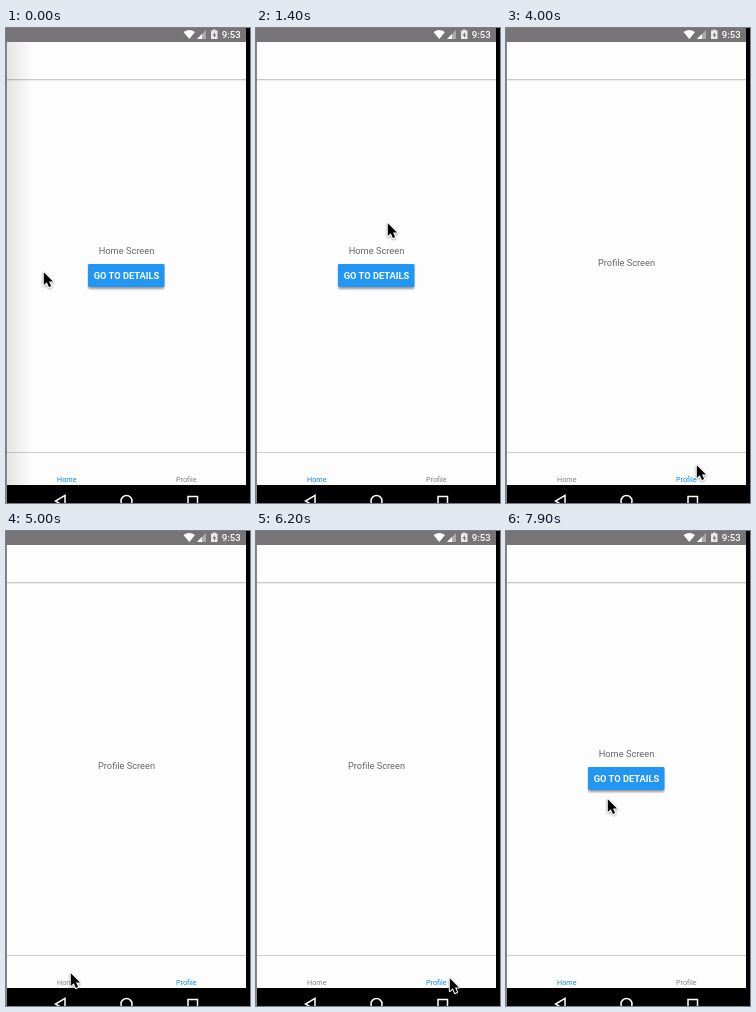
Write an HTML page that moves like this. It is 244x475 px and loops after 8000 ms.

```html
<!DOCTYPE html>
<html lang="en">
<head>
<meta charset="utf-8">
<title>Tab navigation</title>
<style>
  html, body { margin: 0; width: 100%; height: 100%; overflow: hidden; background: #fefdfe; }
  svg { display: block; width: 244px; height: 475px; }
  text { font-family: Roboto, sans-serif; text-anchor: middle; }
  .title { font-size: 9.25px; fill: #686668; }
  .button { font-size: 9.3px; font-weight: 700; fill: #fff; }
  .tab { font-size: 7.25px; fill: #858385; }
  .tab.active { fill: #0a8af0; }
  .clock { font-size: 9.6px; font-weight: 500; }
  #cursor { filter: drop-shadow(0 1px 1px rgba(0, 0, 0, .35)); }
</style>
</head>
<body>
<svg viewBox="0 0 244 475">
  <defs>
    <linearGradient id="headerShade" x2="0" y2="1">
      <stop offset="0" stop-color="#b8b6b8"/>
      <stop offset="1" stop-color="#fefdfe"/>
    </linearGradient>
    <linearGradient id="edgeShade">
      <stop offset="0" stop-opacity=".1"/>
      <stop offset="1" stop-opacity="0"/>
    </linearGradient>
    <filter id="soft" x="-10%" y="-30%" width="120%" height="170%">
      <feGaussianBlur stdDeviation="1.2"/>
    </filter>
  </defs>

  <rect width="244" height="475" fill="#fefdfe"/>
  <rect y="51" width="240" height="2" fill="url(#headerShade)"/>

  <g id="home">
    <text class="title" x="120.5" y="226.4">Home Screen</text>
    <rect x="82.5" y="238" width="75.5" height="23" opacity=".4" filter="url(#soft)"/>
    <rect x="82" y="236" width="76.5" height="23" rx="1.2" fill="#2196f3"/>
    <text class="button" x="120.5" y="251">GO TO DETAILS</text>
  </g>
  <text id="profile" class="title" x="120.5" y="238">Profile Screen</text>

  <rect y="424" width="240" height="1" fill="#cfcdcf"/>
  <text id="homeTab" class="tab" x="60.8" y="454">Home</text>
  <text id="profileTab" class="tab" x="180.3" y="454">Profile</text>

  <rect id="edge" x="1" y="14" width="26" height="443" fill="url(#edgeShade)"/>
  <rect width="1" height="475" fill="#888"/>

  <rect width="240" height="14" fill="#767476"/>
  <g fill="#fff">
    <path d="M177.5 4Q183.3 -.2 189 4L183.3 11Z"/>
    <path d="M200 2V11H191Z" opacity=".4"/>
    <path d="M196 6V11H191Z"/>
    <path d="M207 1.5H209.5V2.5H211.5V11H205V2.5H207Z" opacity=".85"/>
    <path d="M208.8 4L206.5 7.5H208V10L210.2 6.5H208.8Z" fill="#767476"/>
    <text class="clock" x="225.3" y="9.8">9:53</text>
  </g>

  <rect x="1" y="457" width="243" height="18"/>
  <rect x="240" width="4" height="475"/>
  <g fill="none" stroke="#fff" stroke-width="1.5">
    <path d="M59 467.3L49.5 473L59 478.7Z"/>
    <circle cx="120.5" cy="473" r="5.5"/>
    <rect x="182" y="468.5" width="9.5" height="10"/>
  </g>

  <path id="cursor" d="M0 0V12.8L3 10L5.1 14.8L7.3 13.8L5.2 9.2H9.2Z"
        stroke="#fff" stroke-width="2" stroke-linejoin="round" paint-order="stroke"/>
</svg>
<script>
  const LOOP = 8000, TICK = 100, SHADE_END = 1400;

  // Each move glides from the previous resting point; bend arcs it sideways.
  const rest = { x: 37, y: 243 };
  const moves = [
    { from: 700, to: 1200, x: 131, y: 194 },
    { from: 2200, to: 2500, x: 138, y: 245 },
    { from: 2600, to: 3300, x: 190, y: 436, power: 4, bend: 8 },
    { from: 4100, to: 4600, x: 64, y: 441 },
    { from: 5500, to: 6000, x: 193, y: 446 },
    { from: 6300, to: 6800, x: 60, y: 444 },
    { from: 7300, to: 7900, x: 101, y: 267 }
  ];
  // Every tap switches between the two tabs.
  const taps = [3500, 5100, 6200, 7000];

  const el = id => document.getElementById(id);
  const show = (id, on) => el(id).style.display = on ? "" : "none";

  function pointerAt(t) {
    let { x, y } = rest;
    for (const { from, to, x: toX, y: toY, power = 2, bend = 0 } of moves) {
      if (t <= from) break;
      const p = Math.min(1, (t - from) / (to - from));
      const e = 1 - (1 - p) ** power;
      x += (toX - x) * e + bend * Math.sin(Math.PI * e);
      y += (toY - y) * e;
    }
    return [x, y];
  }

  function draw(t) {
    const onProfile = taps.filter(tap => t >= tap).length % 2 === 1;
    show("home", !onProfile);
    show("profile", onProfile);
    show("edge", t < SHADE_END);
    el("homeTab").classList.toggle("active", !onProfile);
    el("profileTab").classList.toggle("active", onProfile);
    const [x, y] = pointerAt(t).map(Math.round);
    el("cursor").setAttribute("transform", `translate(${x + .8} ${y + 1.2})`);
  }

  const start = performance.now();
  function frame(now) {
    const t = Math.max(0, now - start) % LOOP;
    draw(Math.floor(t / TICK) * TICK);
    requestAnimationFrame(frame);
  }
  draw(0);
  requestAnimationFrame(frame);
</script>
</body>
</html>
```
